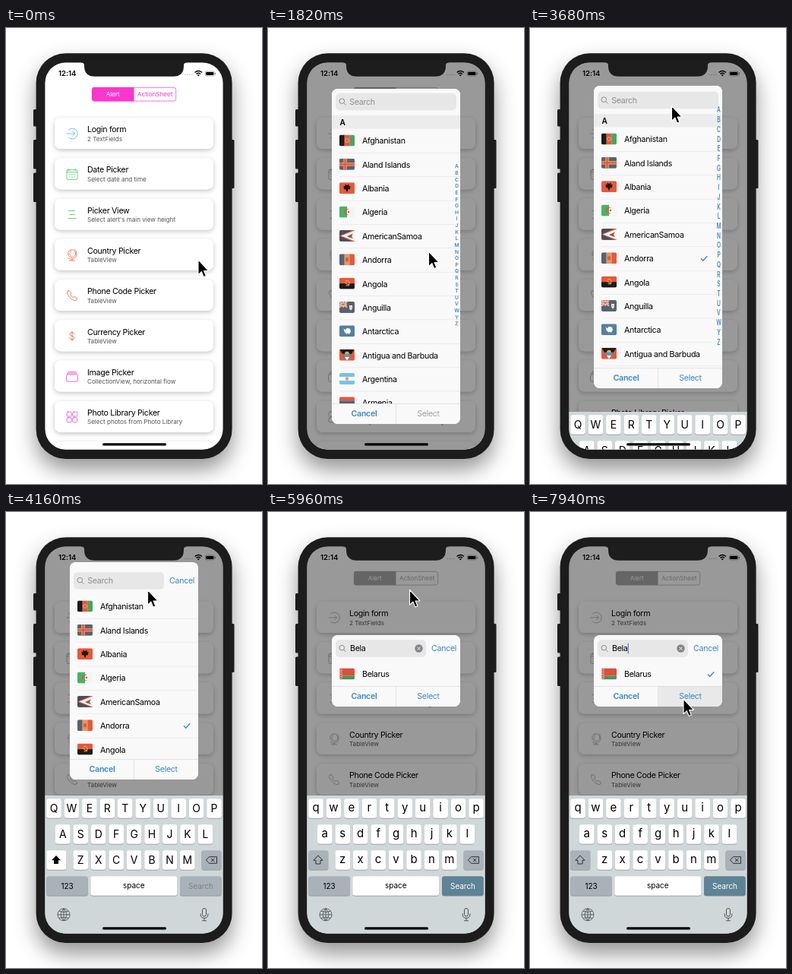
An HTML page that plays this animation: 337x600 px, repeating every 8 s.

```html
<!DOCTYPE html>
<html lang="en">
<head>
<meta charset="utf-8">
<title>Country picker</title>
<style>
  html, body { margin: 0; width: 100%; height: 100%; overflow: hidden; background: #fff; }
  svg { display: block; width: 100%; height: 100%; font-family: Inter, "Open Sans", sans-serif; }
  .icon { fill: none; stroke-width: .8; stroke-linecap: round; stroke-linejoin: round; }
  .tint-fill { fill: #fc36cc; }
  .tint-line { stroke: #fc36cc; fill: none; }
  .dim .icon, .dim .tint-line { stroke: #a8a8a8; }
  .dim .tint-fill { fill: #a8a8a8; }
  .mid { text-anchor: middle; }
</style>
</head>
<body>
<svg id="stage" viewBox="0 0 337 600"></svg>
<script>
const BLUE = '#3d88c6', RED = '#e9573a', SLATE = '#56636f', BLACK = '#1b1b1b', GREEN = '#48a65c';
const ROW = 31.35, LOOP = 8000, TICK = 60;

const rect = (x, y, w, h, fill, r = 0, more = '') =>
  `<rect x="${x}" y="${y}" width="${w}" height="${h}" rx="${r}" fill="${fill}" ${more}/>`;
const path = (d, fill = 'none', more = '') => `<path d="${d}" fill="${fill}" ${more}/>`;
const disc = (x, y, r, fill, more = '') => `<circle cx="${x}" cy="${y}" r="${r}" fill="${fill}" ${more}/>`;
const group = (x, y, body, more = '') => `<g transform="translate(${x} ${y})" ${more}>${body}</g>`;
const text = (x, y, s, size = 10.65, more = '') =>
  `<text x="${x}" y="${y}" font-size="${size}" letter-spacing="${size === 10.65 ? -.31 : -.04}" ${more}>${s}</text>`;

// ---- flags, drawn in a 20 x 15 box
const cols = (...c) => c.map((f, i) => rect(i * 20 / c.length, 0, 20 / c.length + .1, 15, f)).join('');
const bars = (...c) => c.map((f, i) => rect(0, i * 15 / c.length, 20, 15 / c.length + .1, f)).join('');
const jack = rect(0, 0, 10, 7.5, SLATE) +
  path('M0 0L10 7.5M10 0L0 7.5M5 0V7.5M0 3.75H10', 'none', 'stroke="#fff" stroke-width="2"') +
  path('M0 0L10 7.5M10 0L0 7.5M5 0V7.5M0 3.75H10', 'none', `stroke="${RED}" stroke-width=".9"`);
const flags = {
  'Afghanistan': cols(BLACK, RED, GREEN) + disc(10, 7.5, 2.4, 'none', 'stroke="#f3b9a3" stroke-width=".8"'),
  'Aland Islands': rect(0, 0, 20, 15, SLATE) +
    path('M7.5 0V15M0 7.5H20', 'none', 'stroke="#f3a877" stroke-width="4.4"') +
    path('M7.5 0V15M0 7.5H20', 'none', `stroke="${RED}" stroke-width="2.4"`),
  'Albania': rect(0, 0, 20, 15, RED) +
    path('M10 4L8.5 2.5 7 3.5 8 5 5.5 4.5 6 9 8.5 9 9 11 10 13 11 11 11.5 9 14 9 14.5 4.5 12 5 13 3.5 11.5 2.5Z', BLACK),
  'Algeria': cols('#43b566', '#f4f4f4') +
    path('M12.8 4.6A4 4 0 1 0 12.8 10.4A3.3 3.3 0 1 1 12.8 4.6Z', RED) + disc(12, 7.5, 1.2, RED),
  'AmericanSamoa': rect(0, 0, 20, 15, '#4d4c59') + path('M0 7.5L20 -1V16Z', RED) +
    path('M2 7.5L20 .5V14.5Z', '#f6f2ef') + path('M10 8L18 4.5 16 8 18 11 13 9.5Z', '#8c5a48'),
  'Andorra': cols(SLATE, '#e9945f', RED) + rect(8, 5, 4, 5, '#c2694a', 1),
  'Angola': bars(RED, BLACK) + path('M8 4.5A3.2 3.2 0 1 1 8.5 10M7 6L13 10.5', 'none', 'stroke="#f2a53d" stroke-width="1.1"'),
  'Anguilla': rect(0, 0, 20, 15, SLATE) + jack + path('M13 5H17V8Q17 10.5 15 11.5Q13 10.5 13 8Z', '#f1efe9') + disc(15, 7.5, 1, '#f0a060'),
  'Antarctica': rect(0, 0, 20, 15, '#55809f') + path('M5.5 4L7.5 6 10 3.5 14 4.5 15 8 13 11.5 10.5 10.5 9.5 11.5 6.5 8.5Z', '#fff'),
  'Antigua and Barbuda': rect(0, 0, 20, 15, RED) + path('M0 0H20L10 15Z', BLACK) +
    disc(10, 6, 2.8, '#f4ac4c') + path('M4 6H16L13.3 10H6.7Z', '#5c93b8') + path('M6.7 10H13.3L10 15Z', '#fff'),
  'Argentina': bars('#72c4ee', '#fff', '#72c4ee') + disc(10, 7.5, 2.3, '#ef9a62'),
  'Armenia': bars(RED, SLATE, '#f0994d'),
  'Bahamas': bars('#4f9fb8', '#f4c45c', '#4f9fb8') + path('M0 0L9 7.5 0 15Z', BLACK),
  'Bahrain': rect(0, 0, 20, 15, RED) + path('M0 0H6L9 1.5 6 3 9 4.5 6 6 9 7.5 6 9 9 10.5 6 12 9 13.5 6 15H0Z', '#fff'),
  'Bangladesh': rect(0, 0, 20, 15, '#3f7d5a') + disc(9, 7.5, 4, RED),
  'Barbados': cols(SLATE, '#f4b74c', SLATE) + path('M10 3.5V11M8 4.5V8H12V4.5', 'none', `stroke="${BLACK}"`),
  'Belarus': rect(0, 0, 20, 10, '#d9503c') + rect(0, 10, 20, 5, '#4b9252') + rect(0, 0, 3.4, 15, '#eeb5a5') +
    path('M1.7 0V15', 'none', `stroke="${RED}" stroke-width="2.2" stroke-dasharray="2 .8"`),
  'Belgium': cols(BLACK, '#f99c74', '#f1593c'),
  'Belize': rect(0, 0, 20, 15, '#4f5f6c') + rect(0, 0, 20, 1.7, RED) + rect(0, 13.3, 20, 1.7, RED) +
    disc(10, 7.5, 4.2, '#f2eee6') + disc(10, 7.5, 2.6, '#71856c'),
  'Benin': rect(0, 0, 20, 7.5, '#f4c550') + rect(0, 7.5, 20, 7.5, RED) + rect(0, 0, 8, 15, GREEN),
  'Bermuda': rect(0, 0, 20, 15, RED) + jack + rect(13, 5, 4, 5.5, '#f1efe9', 1),
};
const names = Object.keys(flags);
const lists = { '': names.slice(0, 12) };
for (const q of ['B', 'Be', 'Bel', 'Bela']) lists[q] = names.filter(n => n.startsWith(q));

const listBody = items => items.map((n, i) =>
  group(94, i * ROW - 8, `<g clip-path="url(#flagClip)">${flags[n]}</g>`) + text(124, i * ROW + 3.9, n)).join('') +
  Array.from({ length: 12 }, (_, i) => rect(94, (i + .5) * ROW, 159, .5, '#dedede')).join('');

// ---- menu behind the alert
const square = (x, y) => `M${x + 1.4} ${y}h3.2q1.4 0 1.4 1.4v3.2q0 1.4 -1.4 1.4h-3.2q-1.4 0 -1.4 -1.4v-3.2q0 -1.4 1.4 -1.4z`;
const menu = [
  ['Login form', '2 TextFields', '#55b3dc', 'M-4.5 -5.2A7 7 0 1 1 -4.5 5.2M-7 0H3.5M.7 -2.8L3.5 0 .7 2.8'],
  ['Date Picker', 'Select date and time', '#4cc25f',
    'M-6 -5.5H6Q7 -5.5 7 -4.5V6Q7 7 6 7H-6Q-7 7 -7 6V-4.5Q-7 -5.5 -6 -5.5ZM-7 -2.5H7M-4 -7V-4.5M4 -7V-4.5M-.5 .3H.5M3.2 .3H4M-4 3.7H-3.2M-.5 3.7H.5M3.2 3.7H4M-4 .3H-3.2'],
  ['Picker View', "Select alert's main view height", '#4cc25f', 'M-5 -5H3.5M-3 0H3.5M-5 5H5.5'],
  ['Country Picker', 'TableView', '#e7623e',
    'M4.8 -2A5 5 0 1 1 -5.2 -2A5 5 0 1 1 4.8 -2M-2 -6.4Q-.5 -4 -2.5 -3T-1.5 1M3.5 -7A6.9 6.9 0 0 1 -5 4M0 5V7.2M-3.5 7.2H3.5'],
  ['Phone Code Picker', 'TableView', '#e7623e',
    'M-5.5 -6.2L-3.5 -6.5 -1 -3 -2.3 -1.2Q-1 1.4 1.3 2.5L3 1.2 6.5 3.7 6 5.8Q4.5 7 2 6Q-4.5 3 -6.5 -3.2Q-6.8 -5 -5.5 -6.2Z'],
  ['Currency Picker', 'TableView', '#e7623e', 'M2.7 -2.6Q2.2 -4.6 -.2 -4.6Q-2.8 -4.5 -2.8 -2.4Q-2.7 -.6 0 0Q2.9 .6 2.9 2.6Q2.7 4.7 0 4.7Q-2.7 4.6 -3 2.4M0 -6.5V6.5'],
  ['Image Picker', 'CollectionView, horizontal flow', '#ee42cf',
    'M-6 -2.8H6Q7.5 -2.8 7.5 -1.3V5Q7.5 6.5 6 6.5H-6Q-7.5 6.5 -7.5 5V-1.3Q-7.5 -2.8 -6 -2.8ZM-6.5 -4.6H6.5M-5 -6.4H5'],
  ['Photo Library Picker', 'Select photos from Photo Library', '#ee42cf',
    square(-6.8, -6.8) + square(.8, -6.8) + square(-6.8, .8) + square(.8, .8)],
];
const cardY = i => 118 + i * 53.27;
const cards = Array.from({ length: 9 }, (_, i) => rect(64, cardY(i), 209, 41, '#fff', 8)).join('');
const cardText = menu.map(([title, sub, color, icon], i) => group(0, cardY(i),
  group(87, 21, path(icon, 'none', `class="icon" stroke="${color}"`)) +
  text(107, 19.2, title) + text(107, 30.6, sub, 8.15, 'fill="#555"'))).join('');
const segments = path('M116 78H168.5V96.3H116Q113 96.3 113 93.3V81Q113 78 116 78Z', '', 'class="tint-fill"') +
  rect(113.3, 78.3, 110.4, 17.8, 'none', 3, 'class="tint-line" stroke-width=".7"') +
  text(140.7, 90.1, 'Alert', 8.15, 'fill="#fff" class="mid"') +
  text(196.2, 90.1, 'ActionSheet', 8.15, 'class="mid tint-fill"');
const status = text(69, 63.4, '12:14', 9.6, 'font-weight="600"') +
  [0, 1, 2, 3].map(i => disc(236 + i * 3, 61.5, .8, '#000', 'opacity=".25"')).join('') +
  path('M248.6 58.6Q253.3 54.4 258 58.6M250.4 60.6Q253.3 58 256.2 60.6', 'none', 'stroke="#000" stroke-width="1.4"') +
  path('M251.6 61.8Q253.3 60.6 255 61.8L253.3 63.6Z', '#000') +
  rect(262.3, 57, 12, 6, 'none', 1.8, 'stroke="#000" stroke-width=".6" stroke-opacity=".5"') +
  rect(263.2, 57.9, 10.2, 4.2, '#000', 1) + rect(275, 58.7, .9, 2.6, '#777', .4);

// ---- keyboard, its top edge at y = 0
const key = (x, y, w, fill) => rect(x, y + .8, w, 25.5, '#8b9094', 3) + rect(x, y, w, 25.5, fill, 3);
const keyRows = [['QWERTYUIOP', 63, 4.2], ['ASDFGHJKL', 74.8, 38.2], ['ZXCVBNM', 98.2, 72.2]];
const letters = lower => keyRows.map(([row, x, y]) => [...row].map((c, i) =>
  text(x + i * 23.45, y + (lower ? 17.2 : 18), lower ? c.toLowerCase() : c, lower ? 15 : 14, 'class="mid"')).join('')).join('');
const DARK = '#a9b2b8';
const shift = 'M66 79L72 85.3H69V90H63V85.3H60Z';
const keyboard = rect(51, 0, 235, 190, '#d0d7d9') +
  keyRows.map(([row, x, y]) => [...row].map((_, i) => key(x - 9.8 + i * 23.45, y, 19.6, '#fff')).join('')).join('') +
  key(257.5, 72.2, 26, DARK) + key(53.3, 106.2, 54.5, DARK) + key(111.3, 106.2, 114, '#fff') +
  path('M263.5 85L267.5 80.7H277.5V89.3H267.5ZM270 83L274.5 87M274.5 83L270 87', 'none', 'stroke="#222" stroke-width=".9"') +
  text(80.5, 122.6, '123', 10, 'class="mid"') + text(168.3, 122.4, 'space', 10, 'class="mid"') +
  `<g id="upper">${key(53.3, 72.2, 26, '#fff') + path(shift, '#000') + letters(false) +
    key(229, 106.2, 54.7, DARK) + text(256.5, 122.6, 'Search', 10, 'class="mid" fill="#7b8389"')}</g>` +
  `<g id="lower">${key(53.3, 72.2, 26, DARK) + path(shift, 'none', 'stroke="#222" stroke-width=".9"') + letters(true) +
    key(229, 106.2, 54.7, '#5e8296') + text(256.5, 122.6, 'Search', 10, 'class="mid" fill="#fff"')}</g>` +
  group(76, 156.8, path('M-8 0A8 8 0 1 1 8 0A8 8 0 1 1 -8 0M0 -8V8M-8 0H8M0 -8Q-8 0 0 8Q8 0 0 -8M-6 -4.6Q0 -2 6 -4.6M-6 4.6Q0 2 6 4.6', 'none', 'stroke="#50565a" stroke-width=".9"')) +
  group(261, 156.8, rect(-2.5, -8.3, 5, 10.5, 'none', 2.5, 'stroke="#50565a" stroke-width="1"') +
    path('M-4.8 -1.5V0Q-4.8 4.5 0 4.5Q4.8 4.5 4.8 0V-1.5M0 4.5V8M-3 8H3', 'none', 'stroke="#50565a" stroke-width="1"'));

// ---- alert; the search bar is centred on y = 0
const searchBar = rect(89, -11.3, 159, 22.6, '#e7e7e8', 5, 'id="field"') +
  path('M100.6 -.8A3.3 3.3 0 1 1 94 -.8A3.3 3.3 0 1 1 100.6 -.8M99.8 1.7L102.6 4.5', 'none', 'stroke="#8b8b90" stroke-width="1"') +
  text(107.3, 3.9, 'Search', 10.65, 'id="hint" fill="#8e8e93"') + text(108, 3.9, '', 10.65, 'id="typed"') +
  rect(107.6, -7, 1.1, 14, '#4576b4', .5, 'id="caret"') +
  `<g id="clear">${disc(198.5, 0, 5.2, '#85858a') + path('M196.6 -1.9L200.4 1.9M200.4 -1.9L196.6 1.9', 'none', 'stroke="#fff" stroke-width="1"')}</g>` +
  text(231.6, 3.9, 'Cancel', 10.65, `id="quit" class="mid" fill="${BLUE}"`);
const header = rect(84, 18, 169, 17.5, '#ececec') + text(94.6, 30.8, 'A', 10.2, 'font-weight="600"');
const index = [...'ABCDEFGHIJKLMNOPQRSTUVWYZ'].map((c, i) =>
  text(248.5, (i - 12) * 8.62 + 2.4, c, 6.6, `class="mid" font-weight="600" fill="${BLUE}"`)).join('');
const buttons = rect(84, 0, 169, 28, '#f9f9f9') + rect(169, 0, 84, 28, '#e9e9ea', 0, 'id="press"') +
  rect(84, 0, 169, .5, '#cfcfcf') + rect(168.5, 0, .5, 28, '#cfcfcf') +
  text(126.5, 17.4, 'Cancel', 10.65, `class="mid" font-weight="600" fill="${BLUE}"`) +
  text(211, 17.4, 'Select', 10.65, 'id="select" class="mid"');
const alertBody = rect(84, 40, 169, 500, '#f9f9f9') +
  Object.keys(lists).map(q => `<g id="list${q}">${listBody(lists[q])}</g>`).join('') +
  path('M-4 0L-1.2 2.9 4.2 -3', 'none', `id="check" stroke="${BLUE}" stroke-width="1.4"`) +
  `<g id="bar">${rect(84, -40, 169, 58, '#f9f9f9') + searchBar}<g id="header">${header}</g></g>` +
  `<g id="index">${index}</g><g id="buttons">${buttons}</g>`;

document.getElementById('stage').innerHTML = `<defs>
  <clipPath id="screenClip">${rect(51.4, 45.4, 234.2, 509.2, '#000', 27)}</clipPath>
  <clipPath id="flagClip">${rect(0, 0, 20, 15, '#000', 2)}</clipPath>
  <clipPath id="alertClip">${rect(84, 80, 169, 441, '#000', 8, 'id="mask"')}</clipPath>
  <filter id="bodyShadow" x="-30%" y="-20%" width="160%" height="140%"><feDropShadow dx="0" dy="14" stdDeviation="14" flood-opacity=".42"/></filter>
  <filter id="cardShadow" x="-10%" y="-5%" width="120%" height="110%"><feDropShadow dx="0" dy="2" stdDeviation="3" flood-opacity=".24"/></filter>
  </defs>` +
  rect(36, 107, 8, 22.5, '#222', 1.5) + rect(36, 147, 8, 38.5, '#222', 1.5) + rect(36, 190.5, 8, 38.5, '#222', 1.5) + rect(293, 147, 7.5, 64, '#222', 1.5) +
  rect(39.6, 33.2, 258, 533.8, '#1d1d1d', 39, 'filter="url(#bodyShadow)"') +
  `<g clip-path="url(#screenClip)">${rect(51, 45, 235, 510, '#fff')}
    <g id="menu"><g filter="url(#cardShadow)">${cards}</g>${cardText}${segments}</g>${status}
    ${rect(51, 45, 235, 510, '#000', 0, 'id="shade"')}
    <g id="alert"><g clip-path="url(#alertClip)">${alertBody}</g></g>
    <g id="keyboard">${keyboard}</g>${rect(127, 546.3, 84, 3.1, '#000', 1.5)}</g>` +
  path('M99 44V45.4Q103 45.4 103 49V50Q103 63.8 117 63.8H220Q234 63.8 234 50V49Q234 45.4 238 45.4V44Z', '#1d1d1d') +
  `<g id="cursor">${path('M0 0V19.6L4.4 15.7 7.2 22.6 10.4 21.2 7.6 14.5H13.6Z', '#000', 'stroke="#fff" stroke-width="1.1" stroke-linejoin="round"')}</g>`;

// ---- animation
const el = id => document.getElementById(id);
const set = (id, attrs) => { for (const k in attrs) el(id).setAttribute(k, attrs[k]); };
const show = (id, on) => { el(id).style.display = on ? '' : 'none'; };
const move = (id, x, y) => set(id, { transform: `translate(${x} ${y})` });
const latest = (table, t) => table.filter(row => row[0] <= t).pop();
const ease = u => u * u * (3 - 2 * u);

// start, steps, from, bend, to
const moves = [
  [1340, 9, [253, 305], [234, 104], [211.5, 294]],
  [2240, 10, [211.5, 294], [199, 200], [186.5, 102.5]],
  [6080, 11, [186.5, 102.5], [193, 160], [200, 217]],
  [6920, 10, [200, 217], [201, 231], [202, 246]],
];
const typing = [[0, ''], [5240, 'B'], [5300, 'Be'], [5360, 'Bel'], [5600, 'Bela']];
// time, top, bottom, search centre, keyboard top
const poses = [[0, 80, 521, 97, 570], [3680, 76, 474, 95, 505], [3980, 66, 353, 90.5, 376], [4160, 66, 352, 90.5, 373]];
const shrinkTops = [66, 72, 90, 110, 122, 129, 131, 138, 147, 154, 159, 161, 162];
// time, alert opacity, scale, shade
const fades = [[0, 0, 1, 0], [500, .5, 1.07, .22], [620, .95, 1.006, .4], [800, 1, 1, .4]];
// time, caret shown
const blinks = [[0, 0], [4220, 1], [4400, 0], [4760, 1], [5780, 0], [6080, 1], [6560, 0], [6920, 1], [7340, 0], [7700, 1]];

function cursorAt(t) {
  const m = latest(moves, t);
  if (!m) return moves[0][2];
  const [start, steps, a, b, c] = m;
  const u = ease(Math.min(1, ((t - start) / TICK + 1) / steps));
  return [0, 1].map(i => a[i] * (1 - u) ** 2 + 2 * b[i] * u * (1 - u) + c[i] * u * u);
}

function poseAt(t) {
  if (t < 5240) return latest(poses, t).slice(1);
  const top = shrinkTops[Math.min(shrinkTops.length - 1, Math.floor((t - 5240) / TICK))];
  return [top, 418 - top, top + 17.5 + Math.max(0, (110 - top) / 44 * 7), 373];
}

function caretAt(t) {
  const [start, on] = latest(blinks, t);
  const u = start === 4220 ? 1 : Math.min(1, ((t - start) / TICK + 1) / 3);
  return on ? u : 1 - u;
}

function draw(ms) {
  const t = Math.max(0, Math.floor((ms - 20) / TICK) * TICK + 20);
  const [, alpha, scale, shade] = latest(fades, t);
  const [top, bottom, mid, keys] = poseAt(t);
  const query = latest(typing, t)[1];
  const searching = t >= 3980, picked = t >= 2060;
  const first = mid + (searching ? 34 : 51.5);

  el('menu').classList.toggle('dim', t >= 500);
  set('shade', { opacity: shade });
  set('alert', { opacity: alpha, transform: `translate(168.5 300.5) scale(${scale}) translate(-168.5 -300.5)` });
  show('alert', alpha > 0);
  set('mask', { y: top, height: bottom - top });
  move('bar', 0, mid);
  move('buttons', 0, bottom - 27);
  for (const q in lists) { show('list' + q, q === query); move('list' + q, 0, first); }

  show('header', !searching);
  show('index', !searching);
  set('index', { transform: t >= 3680 ? 'translate(0 260.5) scale(1 1.475)' : 'translate(0 285.5)' });
  set('field', { width: searching ? 119 : 159 });
  show('quit', searching);
  set('quit', { opacity: t < 4160 ? .7 : 1 });
  show('hint', !query);
  show('clear', query);
  el('typed').textContent = query;
  set('caret', { opacity: caretAt(t), x: query ? 108.2 + el('typed').getComputedTextLength() : 107.6 });

  show('check', query ? t >= 6740 : picked);
  move('check', searching ? 238 : 229, first + (query ? 0 : 5 * ROW));
  set('select', { fill: picked ? BLUE : '#a0a0a0' });
  show('press', t >= 7940);

  show('keyboard', keys < 560);
  move('keyboard', 0, keys);
  show('upper', !query);
  show('lower', query);
  move('cursor', ...cursorAt(t));
}

const begin = performance.now();
function frame() {
  draw((performance.now() - begin) % LOOP);
  requestAnimationFrame(frame);
}
frame();
</script>
</body>
</html>
```
